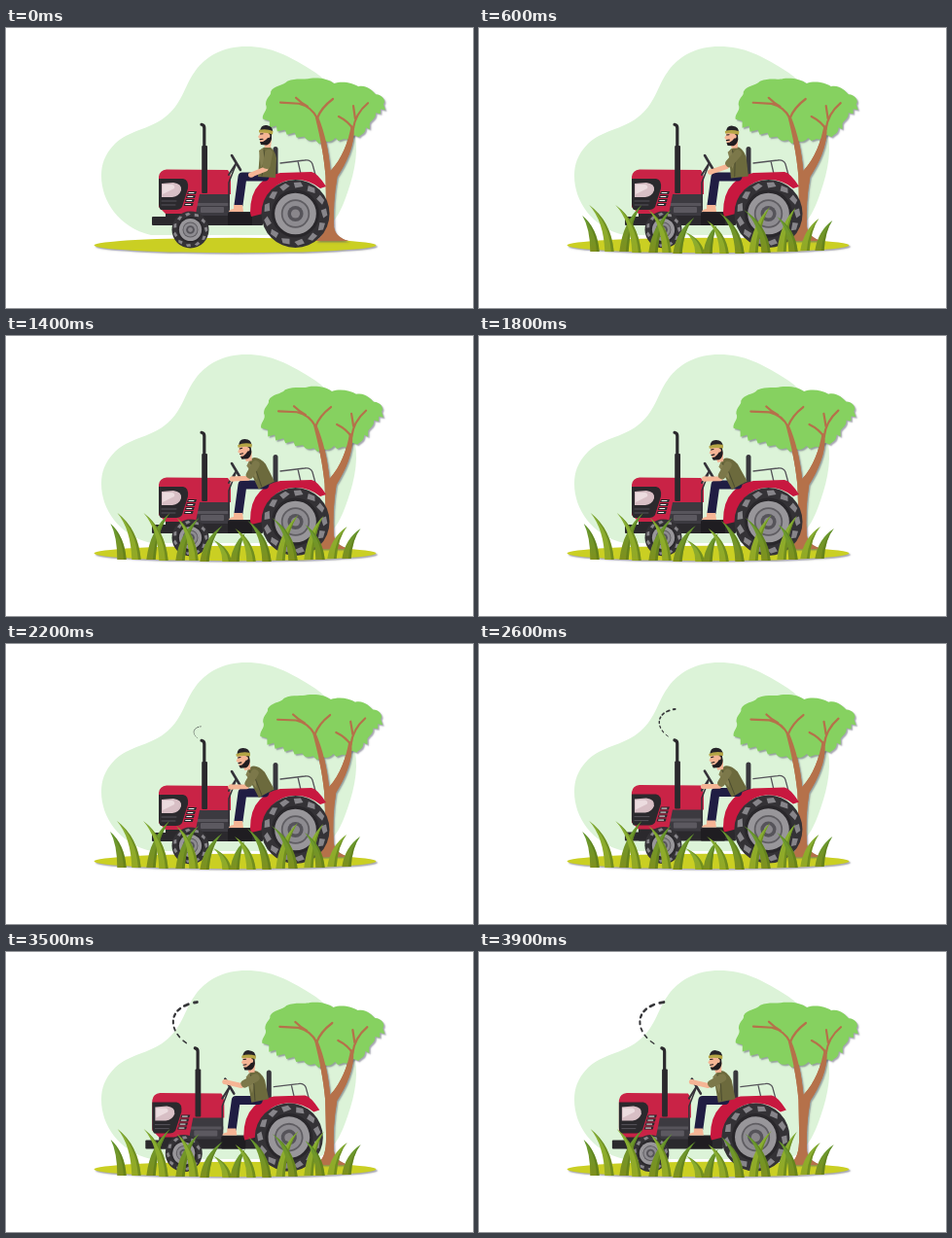
Animation, 480 px wide and 288 px high, one loop 4000 ms. Source, as an HTML page with a canvas:

```html
<!DOCTYPE html>
<html lang="en">
<head>
<meta charset="utf-8">
<style>
html, body { margin: 0; width: 100%; height: 100%; overflow: hidden; background: #fff; }
canvas { display: block; width: 480px; height: 288px; }
</style>
</head>
<body>
<canvas id="stage" width="480" height="288"></canvas>
<script>
const ctx = document.getElementById('stage').getContext('2d');
const LOOP = 4000, STEP = 100;
const RED = '#c8183f', HOOD = '#c92346', DARK = '#2b292d', SKIN = '#f5b595', TRUNK = '#b5714a';

const BLOB = new Path2D('M247 19C223 19 205 29 194 45C183 60 181 79 163 92C148 104 127 105 112 119C101 130 98 141 98 152C98 178 116 205 149 213L318 213C340 204 347 182 354 160C361 137 363 116 354 92C342 67 328 51 312 42C291 29 273 19 247 19Z');
const CANOPY = new Path2D('M263 94C262 88 269 85 266 79C266 72 272 70 271 66C274 59 284 60 288 55C298 51 306 54 312 52C322 51 331 53 336 57C344 54 355 56 361 60C370 58 376 65 379 68C386 68 390 75 387 78L389 84L384 83L384 88L379 87C380 93 374 95 373 98L373 104L369 102C369 109 364 109 362 112L357 110Q352 116 347 114L341 116L338 113Q332 119 327 116L321 119L317 115Q309 118 306 112L298 113L296 108L288 110L286 105L278 107L277 101L270 103L270 96Z');
const TREE = new Path2D('M318 219C327 214 329 205 329 190L328 152C326 130 322 112 317 92L320 91C327 108 331 126 333 147C345 134 351 117 354 100L357 101C358 121 349 139 340 153C337 170 336 188 337 205C338 213 345 217 352 219Z');
const TWIGS = new Path2D('M319 93Q313 81 300 78L281 77M309 81Q302 77 297 72M319 93Q323 82 335 73M356 104Q351 96 341 91M356 104Q358 88 371 77M358 93Q357 86 356 80');

// base x, base y, tip x, tip y
const BLADES = [
  [119, 230, 107, 193], [134, 230, 114, 182], [149, 230, 168, 182], [162, 231, 141, 182],
  [179, 231, 198, 187], [193, 231, 175, 187], [204, 232, 222, 195], [227, 232, 213, 210],
  [235, 232, 245, 203], [252, 232, 235, 198], [268, 232, 248, 190], [282, 231, 300, 184],
  [295, 231, 273, 187], [311, 230, 326, 185], [323, 230, 307, 194], [335, 229, 350, 196],
  [350, 229, 364, 198]
];

// driver's motion as [time, value] keys
const LEAN = [[0, 0], [1700, -.56], [2600, -.56], [3500, -.25]];
const HAND_X = [[0, 252], [900, 233], [2600, 231], [3500, 232]];
const HAND_Y = [[0, 151], [900, 147], [2600, 147], [3500, 134]];

const clamp = v => Math.max(0, Math.min(1, v));
const ease = v => v * v * (3 - 2 * v);

function track(keys, t) {
  let value = keys[0][1];
  for (let i = 1; i < keys.length; i++) {
    const [from, a] = keys[i - 1], [to, b] = keys[i];
    value += (b - a) * ease(clamp((t - from) / (to - from)));
  }
  return value;
}

function fill(color, path) {
  ctx.fillStyle = color;
  path ? ctx.fill(path) : ctx.fill();
}

function shape(color, d) {
  fill(color, new Path2D(d));
}

function line(color, width, d) {
  ctx.strokeStyle = color;
  ctx.lineWidth = width;
  ctx.lineCap = ctx.lineJoin = 'round';
  ctx.stroke(d instanceof Path2D ? d : new Path2D(d));
}

function oval(color, x, y, rx, ry = rx) {
  ctx.beginPath();
  ctx.ellipse(x, y, rx, ry, 0, 0, Math.PI * 2);
  fill(color);
}

function box(color, x, y, w, h, r = 0) {
  ctx.beginPath();
  ctx.roundRect(x, y, w, h, r);
  fill(color);
}

function local(x, y, angle, draw) {
  ctx.save();
  ctx.translate(x, y);
  ctx.rotate(angle);
  draw();
  ctx.restore();
}

function shaded(draw) {
  ctx.save();
  ctx.shadowColor = 'rgba(90,90,110,.55)';
  ctx.shadowOffsetX = 1.5;
  ctx.shadowOffsetY = 1.5;
  ctx.shadowBlur = 1.5;
  draw();
  ctx.restore();
}

function drawTree(t) {
  const shift = -.4 + 1.4 * Math.cos(2 * Math.PI * (t - 150) / LOOP);
  local(335, 218, shift / 135, () => {
    ctx.translate(-335, -218);
    shaded(() => fill(TRUNK, TREE));
    shaded(() => fill('#86d160', CANOPY));
    fill(TRUNK, TREE);
    line(TRUNK, 2.2, TWIGS);
  });
}

function drawWheel(x, y, r, angle, lugs) {
  local(x, y, angle, () => {
    oval('#343236', 0, 0, r);
    for (let i = 0; i < lugs; i++) {
      ctx.rotate(2 * Math.PI / lugs);
      ctx.beginPath();
      ctx.moveTo(r * .75, -r * .1);
      ctx.lineTo(r * .9, -r * .16);
      ctx.lineTo(r * .94, r * .04);
      ctx.lineTo(r * .82, r * .13);
      ctx.closePath();
      fill('#87858a');
    }
    oval('#29272b', 0, 0, r * .7);
    oval('#98969a', 0, 0, r * .61);
    oval('#5f5d62', 0, 0, r * .42);
    oval('#8d8b90', 0, 0, r * .37);
    oval('#56545a', 0, 0, r * .23);
    oval('#89868b', 0, 0, r * .13);
  });
}

function elbowBetween(x1, y1, x2, y2) {
  const dx = x2 - x1, dy = y2 - y1, d = Math.hypot(dx, dy);
  const bend = Math.sqrt(Math.max(0, 18 * 18 - d * d / 4));
  return [(x1 + x2) / 2 + dy / d * bend * .7, (y1 + y2) / 2 - dx / d * bend * .7];
}

function drawHead() {
  shape(SKIN, 'M-6 -5L5 -5L6 3L5 12L-1 12L-2 7L-6 6L-6 3L-8 1L-6 -2Z');
  shape('#211c20', 'M3 -4L6 -4L6 3Q5 8 1 9.5L-5 9L-6 6L-3 6L0 4L3 1Z');
  line('#211c20', 1, 'M-5.5 -2L-3 -2.2');
  line('#211c20', 1.1, 'M-6 3.6L-3 3.3');
  shape('#262329', 'M-6 -5Q-5 -12 1 -11Q8 -10 7 -3Z');
  shape('#b5a545', 'M-7 -6Q0 -8 7.5 -5L7 -1.5Q0 -4 -7 -3.5Z');
  oval(SKIN, 3, 0, 1.5, 2);
}

function drawDriver(t) {
  const lean = track(LEAN, t), hx = track(HAND_X, t), hy = track(HAND_Y, t);
  line('#201d43', 9, 'M266 153L243 153L239 182');
  shape(SKIN, 'M234 182L243 182L244 189L229 189Q229 187 234 186Z');
  local(268, 154, lean, () => {
    shape('#6c6a3d', 'M-9 -1L-7 -27Q-5 -32 2 -32Q8 -30 10 -20L9 0Z');
    shape('#858052', 'M-8 -28L-3 -31L-2 -18L-6 -10Z');
    line('#4c4c30', 1, 'M-3 -29L-2 -18L-5 -2');
    local(-1, -43, -lean * .7, drawHead);
  });
  const sx = 270 + Math.sin(lean) * 27, sy = 154 - Math.cos(lean) * 25;
  const [ex, ey] = elbowBetween(sx, sy, hx, hy);
  const mid = (a, b) => a + (b - a) * .75;
  line(SKIN, 5, `M${sx} ${sy}L${ex} ${ey}L${hx} ${hy}`);
  line('#7c784a', 8, `M${sx} ${sy}L${mid(sx, ex)} ${mid(sy, ey)}`);
  oval(SKIN, hx, hy, 3, 2.6);
}

// point on the puff's curve, k from the pipe (0) to the far end (1)
function smokePoint(k) {
  const u = 1 - k;
  return [
    3 * u * u * k * -26 + 3 * u * k * k * -30 + k ** 3 * 4,
    3 * u * u * k * -12 + 3 * u * k * k * -41 + k ** 3 * -46
  ];
}

function drawSmoke(t) {
  const size = clamp((t - 1900) / 1050);
  if (!size) return;
  const dashes = 8, drift = t / 450 % 1;
  local(199, 98, 0, () => {
    ctx.scale(size, size);
    for (let i = 0; i < dashes; i++) {
      const k = (i + drift) / dashes;
      const [x1, y1] = smokePoint(k), [x2, y2] = smokePoint(Math.min(1, k + .055));
      line('#363639', 1.2 + 1.8 * k, `M${x1} ${y1}L${x2} ${y2}`);
    }
  });
}

function drawTractor(t) {
  const run = Math.max(0, (t - 2500) / 1000);
  const dx = -6.7 * run * run;
  ctx.save();
  ctx.translate(dx, run ? -.4 : 0);

  drawSmoke(t);
  line('#55545a', 1.3, 'M282 139L307 136Q313 135 315 140L318 151M300 137L303 150');
  box('#38373d', 274.5, 122, 5, 31, 2.5);
  box('#38373d', 256, 150, 24, 5, 2);

  // chassis and engine
  box(DARK, 150, 194, 28, 9, 1);
  box(DARK, 164, 189, 100, 14, 1);
  box('#3c3a40', 195, 168, 35, 25);
  box('#57545b', 195, 180, 35, 3);
  box('#5c5960', 200, 184, 24, 6, 1);
  box('#1f1d21', 228, 190, 25, 13, 1);

  // hood
  shape(HOOD, 'M157 153Q158 146 165 145.5L228 146Q231 149 231 158L231 171L199 171L195 191L164 191L157 184Z');
  shape(DARK, 'M157 155L182 155Q188 156 187 165L181 184Q179 187 175 187L159 187Q157 185 157 180Z');
  shape('#d8bfc5', 'M160 160L172 159Q181 160 180 167Q178 173 171 174L160 174Z');
  shape('#ecdcdf', 'M161 161L171 161Q174 162 173 165L161 171Z');
  line('#55525a', 1, 'M160 178L175 178M160 182L174 182');
  for (let i = 0; i < 4; i++) {
    const x = 187 - i * 1.1, y = 168 + i * 4;
    shape(DARK, `M${x} ${y}h9l-1 3h-9Z`);
    line('#f4eeee', 1, `M${x + 1} ${y + 1.5}h5`);
  }

  // exhaust
  line(DARK, 3.2, 'M203.8 122L203.8 103Q204 100 201 99.3');
  box(DARK, 201.2, 121, 5.8, 49, 1);

  // steering
  line('#353239', 1.5, 'M229 184L229 159L236 141');
  line('#353239', 2.6, 'M232 131L241 146');
  line('#353239', 2, 'M229 151L236 140');

  shape(RED, 'M251 190Q251 170 261 160Q268 152 282 149L314 148Q320 149 329 163L323 165Q311 155 295 156Q269 158 264 191L252 194Z');
  drawDriver(t);
  drawWheel(297.5, 191, 35, dx / 35, 13);
  drawWheel(189.5, 207.5, 19, dx / 19, 11);
  ctx.restore();
}

function drawGrass(t) {
  const grow = 1 - (1 - clamp(t / 600)) ** 2;
  if (!grow) return;
  const sway = .8 * Math.sin(2 * Math.PI * (t - 1200) / 2000);
  BLADES.forEach(([bx, by, tx, ty], i) => {
    const x = bx + (tx - bx + sway) * grow;
    const y = by + (ty - by) * grow;
    const bend = bx + (x - bx) * .12, cy = by + (y - by) * .65;
    const w = 4.7 * grow;
    const tint = ctx.createLinearGradient(0, by, 0, y);
    tint.addColorStop(0, i % 2 ? '#94a823' : '#7f901d');
    tint.addColorStop(1, i % 2 ? '#84b037' : '#659b34');
    ctx.beginPath();
    ctx.moveTo(bx - w, by);
    ctx.quadraticCurveTo(bend - w * .7, cy, x, y);
    ctx.quadraticCurveTo(bend + w * .9, cy, bx + w, by);
    ctx.closePath();
    fill(tint);
    ctx.beginPath();
    ctx.moveTo(bx + w * .4, by);
    ctx.quadraticCurveTo(bend + w * .4, cy, x, y);
    ctx.quadraticCurveTo(bend + w * .9, cy, bx + w, by);
    fill('rgba(86,118,24,.55)');
  });
}

function frame(now) {
  const t = Math.floor(now % LOOP / STEP) * STEP;
  ctx.fillStyle = '#fff';
  ctx.fillRect(0, 0, 480, 288);
  fill('#dcf3d8', BLOB);
  shaded(() => oval('#cacf23', 235.5, 223.5, 145, 7.7));
  drawTree(t);
  drawTractor(t);
  drawGrass(t);
}

const start = performance.now();
function tick() {
  frame(performance.now() - start);
  requestAnimationFrame(tick);
}
tick();
</script>
</body>
</html>
```
